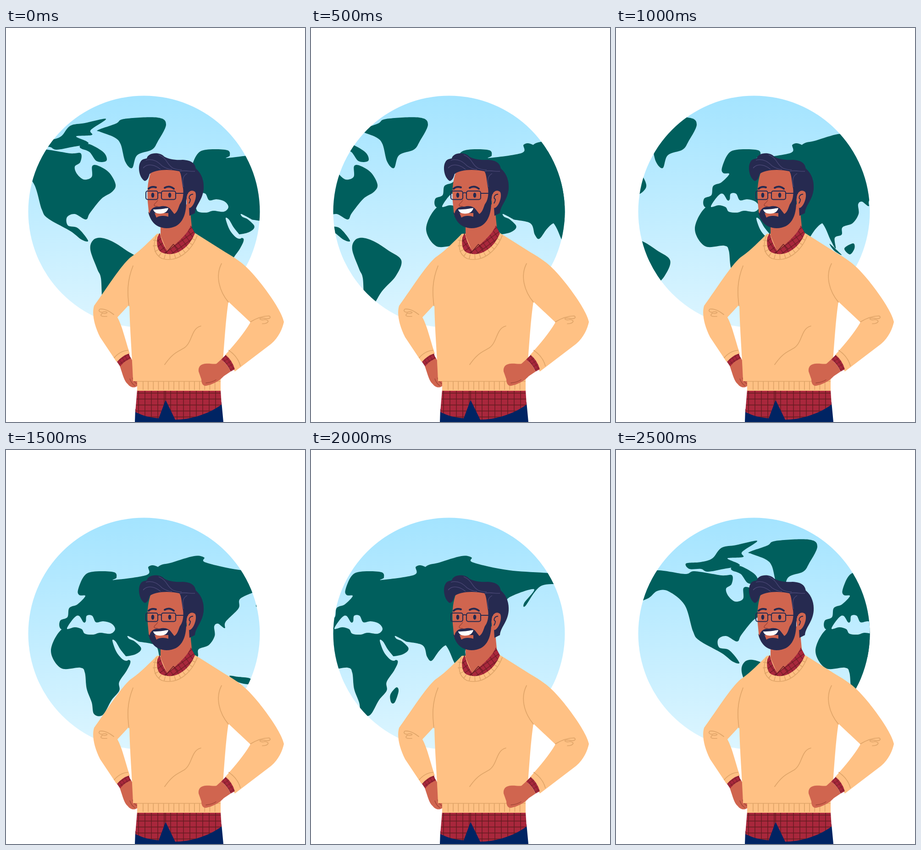
An HTML page for the animation above (3000 ms loop, 652 px wide and 858 px high).

```html
<!DOCTYPE html>
<html lang="en">
<head>
<meta charset="utf-8">
<title>Turning globe</title>
<style>
  html, body { margin: 0; width: 100%; height: 100%; overflow: hidden; background: #fff; }
  svg { display: block; width: 652px; height: 858px; }
  .line { fill: none; stroke: #dfa468; stroke-width: 1.7; stroke-linecap: round; }
  .ribs { stroke-linecap: butt; stroke-dasharray: 1.7 9.5; }
  .skin { fill: #d0654f; }
  .shade { fill: none; stroke: #a04536; stroke-width: 1.4; stroke-linecap: round; }
  .seam { fill: none; stroke: #641a20; stroke-width: 1.4; }
  .hair { fill: #262a50; }
  .strand { fill: none; stroke: #4b4876; stroke-width: 1.3; }
  .frame { fill: none; stroke: #262a50; stroke-width: 2; }
  .brow { fill: none; stroke: #262a50; stroke-width: 4; stroke-linecap: round; }
</style>
</head>
<body>
<svg viewBox="0 0 652 858">
  <defs>
    <linearGradient id="sky" gradientUnits="userSpaceOnUse" x1="0" y1="148" x2="0" y2="652">
      <stop offset="0" stop-color="#a4e4ff"/>
      <stop offset="1" stop-color="#dcf5ff"/>
    </linearGradient>
    <clipPath id="disc"><circle cx="301" cy="400" r="252.5"/></clipPath>
    <pattern id="plaid" width="14" height="13" x="284" y="792" patternUnits="userSpaceOnUse">
      <path fill="#a9273c" d="M0 0H14V13H0z"/>
      <path class="seam" d="M5 0V13M0 3H14"/>
    </pattern>
    <pattern id="plaidTilt" href="#plaid" patternTransform="rotate(-36) scale(.78)"/>
    <pattern id="plaidCuff" href="#plaid" patternTransform="rotate(58) scale(.55)"/>
  </defs>

  <g clip-path="url(#disc)">
    <path fill="url(#sky)" d="M48 147H554V653H48z"/>
    <g id="map">
      <g id="west" fill="#005f5d"></g>
      <g id="east" fill="#005f5d" transform="translate(247)"></g>
    </g>
  </g>

  <!-- trousers and shirt tails -->
  <path fill="#002463" d="M282 830L348 805 470 815 474 858H281z"/>
  <path fill="url(#plaid)" d="M286 788H468L470 820C440 842 400 853 369 853L348 810 333 850C310 848 295 843 282 836z"/>
  <path class="seam" d="M348 789V810"/>

  <!-- far hand -->
  <path class="skin" d="M247 733L271 716 276 725C277 742 279 758 287 768L286 780C280 784 272 784 265 775C257 768 255 755 247 733z"/>
  <path class="shade" d="M270 764Q274 775 281 779M276 762Q279 770 285 775"/>

  <!-- sweater -->
  <path fill="#ffc184" d="M329 448C313 464 295 483 275 497C255 510 220 566 192 605C187 622 192 647 205 673L241 727 270 709C260 680 254 650 243 630L269 602C270 660 275 710 277 769H286V790H468V768C470 740 473 725 474 712C478 660 480 630 485 596L533 641C517 668 497 690 478 712L499 748 578 688C595 674 603 654 606 640C601 612 548 541 519 516C509 507 492 496 478 488L413 447z"/>
  <g class="line">
    <path d="M277 518C263 552 265 580 268 605M470 513C456 540 465 573 485 597"/>
    <path d="M346 733C364 707 375 705 388 697C407 685 403 654 425 649"/>
    <path d="M235 624C225 616 214 611 205 612C200 615 204 621 213 618C226 617 220 624 210 621C203 627 209 629 220 628"/>
    <path d="M533 640C546 632 561 627 574 627C580 631 573 635 563 632C547 630 554 638 564 635C577 636 572 644 559 644"/>
    <path d="M236 718Q249 703 266 702M486 702Q506 716 511 736M286 769.500H467"/>
    <path d="M328 452C319 475 323 493 340 502C374 512 404 486 417 452"/>
    <path class="ribs" stroke-width="10" d="M326 462C322 480 331 495 349 498C376 501 398 484 411 455"/>
    <path class="ribs" stroke-width="18" d="M298 779H466"/>
  </g>

  <!-- cuffs and near hand -->
  <path fill="url(#plaidCuff)" d="M242 727Q254 713 268 709L272 720Q258 725 249 737zM479 712Q493 723 499 743L490 748Q483 732 469 722z"/>
  <path class="skin" d="M469 722Q483 732 490 748L475 758C466 768 452 776 437 779C430 780 426 775 426 765L420 748C419 739 423 734 430 732C441 729 453 733 459 731z"/>
  <path class="shade" d="M436 773Q449 772 458 766"/>

  <!-- neck and collar -->
  <path class="skin" d="M337 420V452L352 488C380 468 400 452 405 432L400 380z"/>
  <path fill="url(#plaidTilt)" d="M335 446L330 456C328 470 330 483 338 488C350 494 365 494 378 487C396 477 406 462 412 447L403 430C395 450 375 466 352 486C344 474 339 462 335 446z"/>
  <path class="seam" d="M352 486L347 491M352 486L365 471L375 481"/>

  <!-- head -->
  <path class="hair" d="M376 300L414 306C428 318 432 335 431 350C429 375 413 386 412 403L400 409 398 370z"/>
  <path class="skin" d="M317 311C310 328 307 350 309 378L312 408 350 430 390 400 397 350 383 300H330z"/>
  <path class="hair" d="M386 348L398 350 393 375C394 410 382 436 350 436C326 435 315 421 310 400L313 404C315 394 322 388 335 389C346 386 355 389 360 396L367 405C374 401 376 391 379 384C385 376 388 365 386 348z"/>
  <path class="skin" d="M324 403H354V411C346 408 334 408 328 413z"/>
  <path fill="#fff" d="M321 395C333 396 345 393 354 392C352 402 342 405 333 404C327 404 322 400 321 395z"/>
  <path class="skin" d="M394 371C394 355 407 350 413 358C417 368 409 390 400 392Q394 391 394 382z"/>
  <path class="frame" stroke-width="1.4" d="M408 362C400 362 397 370 402 373C402 378 400 380 399 382"/>
  <path class="hair" d="M302 333C290 325 287 302 293 292C296 285 303 285 307 284C310 271 335 269 345 280C355 286 370 288 385 287C405 288 415 295 414 313C420 322 416 340 410 352L397 352 386 349C383 335 383 318 378 312C355 307 325 308 313 318C311 326 308 333 302 333z"/>
  <path class="strand" d="M299 305C310 292 328 300 337 308M305 288C322 283 333 293 340 300Q352 308 362 308M333 276C352 284 350 297 364 305Q372 309 383 309M379 312C390 309 402 313 412 312M387 346C383 330 387 321 395 317"/>
  <path class="brow" d="M311 350Q317 344 327 347M346 348Q356 342 366 350"/>
  <ellipse class="hair" cx="320" cy="364" rx="3.300" ry="5.500"/>
  <ellipse class="hair" cx="357" cy="364" rx="3.300" ry="5.500"/>
  <path class="shade" d="M331 375C327 382 322 383 323 386Q325 389 330 388"/>
  <g class="frame">
    <rect x="305" y="355" width="26" height="18.500" rx="4"/>
    <rect x="339" y="355" width="31" height="18.500" rx="4"/>
    <path d="M331 360Q335 357 339 360M370 360H397"/>
  </g>
</svg>

<script>
const $ = id => document.getElementById(id);

// Smooth closed outline through a few key points, written "x,y x,y ..."
function blob(group, points, fill = 'inherit') {
  const p = points.trim().split(/\s+/).map(s => s.split(',').map(Number));
  const at = i => p[(i + p.length) % p.length];
  const handle = (i, sign) => [0, 1].map(k => at(i)[k] + sign * (at(i + 1)[k] - at(i - 1)[k]) / 6);
  const d = p.map((_, i) => `C${handle(i, 1)} ${handle(i + 1, -1)} ${at(i + 1)}`).join('');
  const path = document.createElementNS('http://www.w3.org/2000/svg', 'path');
  path.setAttribute('d', `M${p[0]}${d}z`);
  path.setAttribute('fill', fill);
  $(group).append(path);
}
const sea = 'url(#sky)';

// North America, Arctic islands, Greenland, South America
blob('west', `-60,270 0,262 60,270 82,264 140,273 163,273 162,292 150,302 155,318 170,330 187,324
  188,301 201,300 225,315 239,341 231,357 208,372 183,403 174,417 150,405 133,412 135,430 157,436
  179,463 165,461 140,442 92,415 78,395 60,338 25,308 0,307 -22,324 -60,330`);
blob('west', `63,247 95,244 120,236 140,213 172,207 218,198 185,222 187,233 153,236 176,247
  177,253 145,259 110,265 95,259 70,259`);
blob('west', '163,255 182,253 213,271 219,289 198,290 182,270 163,262');
blob('west', `201,222 240,208 258,198 330,195 349,210 331,247 318,265 286,277 275,305 260,291
  250,253 236,238 205,226`);
blob('west', `184,483 190,462 208,457 234,466 262,484 291,506 279,540 249,573 225,610 211,600
  207,545 199,525`);

// Europe with western Asia, eastern Asia, Africa
blob('east', `157,305 170,275 190,265 235,266 241,278 236,283 307,272 311,254 334,256 400,300
  400,420 376,425 361,438 345,459 335,450 325,425 284,416 267,406 294,430 284,444 255,450 210,450
  150,396 120,390 118,372 134,364 138,344 156,336 173,318 160,316`);
blob('east', `330,256 362,245 410,231 432,234 436,245 515,262 640,272 630,290 582,297 550,339
  547,333 568,303 513,322 507,345 479,374 477,388 462,378 454,384 455,405 442,425 420,434 418,450
  403,457 405,480 394,462 375,424 340,400 310,300`);
blob('east', `98,438 118,394 150,386 232,400 233,415 253,453 271,459 264,479 247,505 247,524
  230,545 211,577 192,575 187,550 176,520 172,485 162,474 120,475`);

// Mediterranean, Red Sea, Gulf
blob('east', `133,389 148,366 159,361 169,375 174,373 176,361 188,361 196,375 212,373 230,378
  238,390 228,400 205,398 190,402 172,400 165,390 150,386`, sea);
blob('east', '232,415 239,417 250,435 266,456 256,457 241,440', sea);
blob('east', '266,405 290,418 270,412', sea);

// Islands
blob('east', '255,533 268,517 273,525 265,549 257,550');
blob('east', '424,480 443,469 446,480 436,493');
blob('east', '392,470 418,494 402,485');
blob('east', '487,492 507,494 533,498 530,510 505,505');

// The map moves in held half-second steps
const steps = [0, -94, -173, -247, -329, 90];
function draw() {
  const step = Math.floor(performance.now() / 500) % steps.length;
  $('map').setAttribute('transform', `translate(${steps[step]})`);
  requestAnimationFrame(draw);
}
draw();
</script>
</body>
</html>
```
